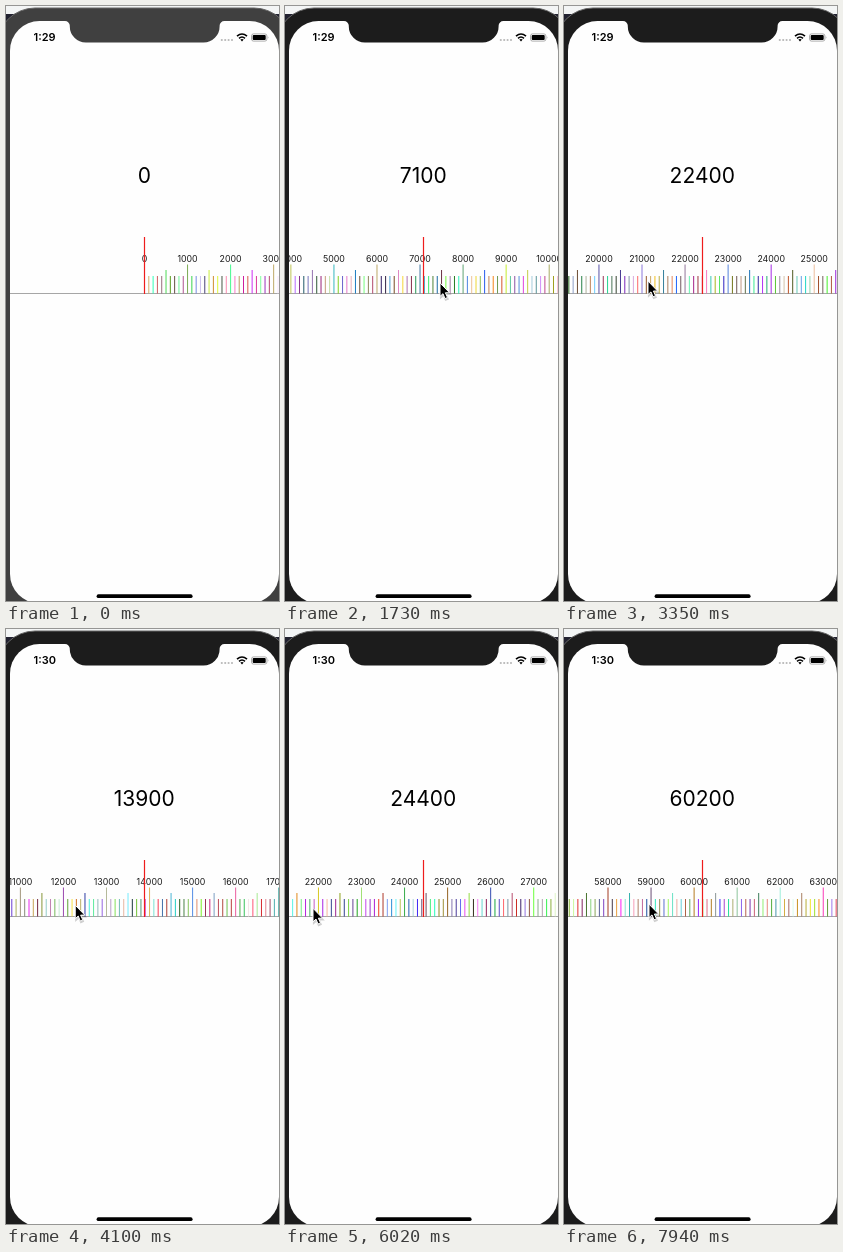
These frames come from a looping animation (273 px wide and 595 px high, 8000 ms). An HTML page:

```html
<!DOCTYPE html>
<html lang="en">
<head>
<meta charset="utf-8">
<title>Ruler picker</title>
<style>
  html, body { margin: 0; width: 100%; height: 100%; overflow: hidden; background: #f3f5f5; }
  svg { display: block; width: 273px; height: 595px; }
  text { font-family: Inter, Roboto, sans-serif; fill: #000; }
  #labels text { font-size: 8.8px; fill: #1a1a1a; text-anchor: middle; }
  #value { font-size: 21px; text-anchor: middle; }
  #clock { font-size: 11px; font-weight: 600; }
</style>
</head>
<body>
<svg viewBox="0 0 273 595">
  <defs>
    <clipPath id="screen"><rect x="4" y="15" width="269" height="582.5" rx="29.5"/></clipPath>
    <path id="arrow" d="M0 0V13.5L3 10.8 5 15.7 7.5 14.6 5.4 9.9H9.6Z"/>
  </defs>
  <rect width="273" height="595" fill="#f3f5f5"/>
  <rect y="8" width="273" height="587" fill="#222230"/>
  <rect id="body" x="-9" y="2" width="295" height="640" rx="38" stroke="#666"/>
  <g clip-path="url(#screen)">
    <rect x="4" y="15" width="269" height="583" fill="#fefefe"/>
    <path d="M4 287.5H273" stroke="#a6a6a6"/>
    <g id="ticks"></g>
    <g id="labels"></g>
    <path d="M138.5 231V288" stroke="#ee1c1c" stroke-width="1.2"/>
    <text id="value" x="138.3" y="177"></text>
    <text id="clock" x="27.5" y="35.3"></text>
    <path d="M215.8 34H227" stroke="#b9b9b9" stroke-width="2.2" stroke-linecap="round" stroke-dasharray="0 3.4"/>
    <g fill="none" stroke="#000" stroke-width="1.6">
      <path d="M231 30.2Q236 25.8 241 30.2"/>
      <path d="M233 32.3Q236 29.7 239 32.3"/>
    </g>
    <path d="M234.3 33.6Q236 32.2 237.7 33.6L236 35.4Z"/>
    <rect x="245.5" y="27.9" width="15.4" height="7.2" rx="2" fill="none" stroke="#999" stroke-width=".8"/>
    <rect x="246.7" y="29" width="13" height="5" rx="1"/>
    <path d="M261.9 30.2Q263 31.5 261.9 32.8Z" fill="#999"/>
    <rect x="90.6" y="588.3" width="96" height="3.7" rx="1.85"/>
  </g>
  <path id="notch" d="M59 14V15A4.8 4.8 0 0 1 63.8 19.8V20.5A16 16 0 0 0 79.8 36.5H197.6A16 16 0 0 0 213.6 20.5V19.8A4.8 4.8 0 0 1 218.4 15V14Z"/>
  <g id="cursor">
    <use href="#arrow" x=".6" y="1.6" opacity=".18" stroke="#000" stroke-width="1.4"/>
    <use href="#arrow" stroke="#fff"/>
  </g>
</svg>
<script>
const $ = id => document.getElementById(id);
const LOOP = 8000, STEP = 147.04, LAG = 40;   // picture refreshes once per STEP
const CENTER = 138.5, GAP = 4.305;
const WAKE = 5, REWIND = 25, MINUTE = 28;     // steps of the one-off changes

const mix = (a, b, u) => a + (b - a) * u;
const easeIn = u => u * u;
const easeOut = u => u * (2 - u);
const smooth = u => u * u * (3 - 2 * u);
const rand = n => { const s = Math.sin(n * 12.9898 + 4.1) * 43758.5453; return s - Math.floor(s); };

// The hand's story: each leg runs from the end of the previous one.
const legs = [];
let last = { end: 0, to: 0, x: 300 };
function add(end, to, x, move) {
  legs.push(last = { start: last.end, end, from: last.to, to, x0: last.x, x, move });
}

// The ruler glides to a stop while the hand moves freely.
function coast(end, to, x) {
  add(end, to, x, u => ({ done: easeOut(u), hand: smooth(u) }));
}

// Repeated flicks: drag, glide while the hand returns, drag again.
function swipe(end, to, x, flicks) {
  const cycles = flicks - .5, dragShare = .45;
  const travel = p => {
    const k = Math.floor(p), u = 2 * (p - k);
    return k + (u < 1 ? dragShare * easeIn(u) : mix(dragShare, 1, easeOut(u - 1)));
  };
  add(end, to, x, u => {
    const p = cycles * u, f = 2 * (p % 1);
    return { done: travel(p) / travel(cycles), hand: f < 1 ? easeIn(f) : 1 - smooth(f - 1) };
  });
}

coast(7, 0, 226);
coast(8, 93, 226);
swipe(16, 11840, 84, 2);
coast(18, 15200, 226);
swipe(23, 22405, 84, 2);
coast(REWIND, 24000, 50);
swipe(30, 9000, 235, 2);
coast(32, -230, 340);
coast(34, 0, 240);
swipe(41, 24440, 28, 2);
coast(43, 29300, 235);
swipe(54, 60195, 85, 4);

function pose(step) {
  const leg = legs.find(l => step <= l.end) || last;
  const u = Math.min(1, (step - leg.start) / (leg.end - leg.start));
  // A half cycle ends exactly where the drag ends.
  const { done, hand } = leg.move(u);
  const x = mix(leg.x0, leg.x, hand);
  return { offset: mix(leg.from, leg.to, done), x, y: 274.5 + x / 40 + Math.max(0, (84 - x) / 10) - 1.5 };
}

function tickColor(n, pass) {
  const channel = k => Math.round(255 * rand(n * 3 + k + pass * 5003));
  return `rgb(${channel(0)},${channel(1)},${channel(2)})`;
}

function draw(step) {
  const { offset, x, y } = pose(step);
  const pass = step < REWIND ? 0 : 1;
  const mid = offset / 100;
  const first = Math.max(0, Math.ceil(mid - (CENTER - 4) / GAP));
  let ticks = '', labels = '';
  for (let n = first; n <= mid + 32; n++) {
    const tx = (CENTER + (n - mid) * GAP).toFixed(2);
    const top = n % 10 === 0 ? 258.5 : n % 5 === 0 ? 264 : 270;
    ticks += `<path d="M${tx} ${top}V287.5" stroke="${tickColor(n, pass)}" stroke-width=".9"/>`;
    if (n % 10 === 0) labels += `<text x="${tx}" y="256.3">${n * 100}</text>`;
  }
  $('ticks').innerHTML = ticks;
  $('labels').innerHTML = labels;
  $('value').textContent = Math.max(0, Math.round(mid)) * 100;
  $('clock').textContent = step < MINUTE ? '1:29' : '1:30';
  const shell = step < WAKE ? '#404040' : '#1c1c1c';
  $('body').setAttribute('fill', shell);
  $('notch').setAttribute('fill', shell);
  $('cursor').setAttribute('transform', `translate(${x.toFixed(2)} ${y.toFixed(2)})`);
}

let origin, shown = 0;
function tick(now) {
  origin ??= now;
  const step = Math.floor(((now - origin) % LOOP + LAG) / STEP);
  if (step !== shown) draw(shown = step);
  requestAnimationFrame(tick);
}
draw(0);
requestAnimationFrame(tick);
</script>
</body>
</html>
```
